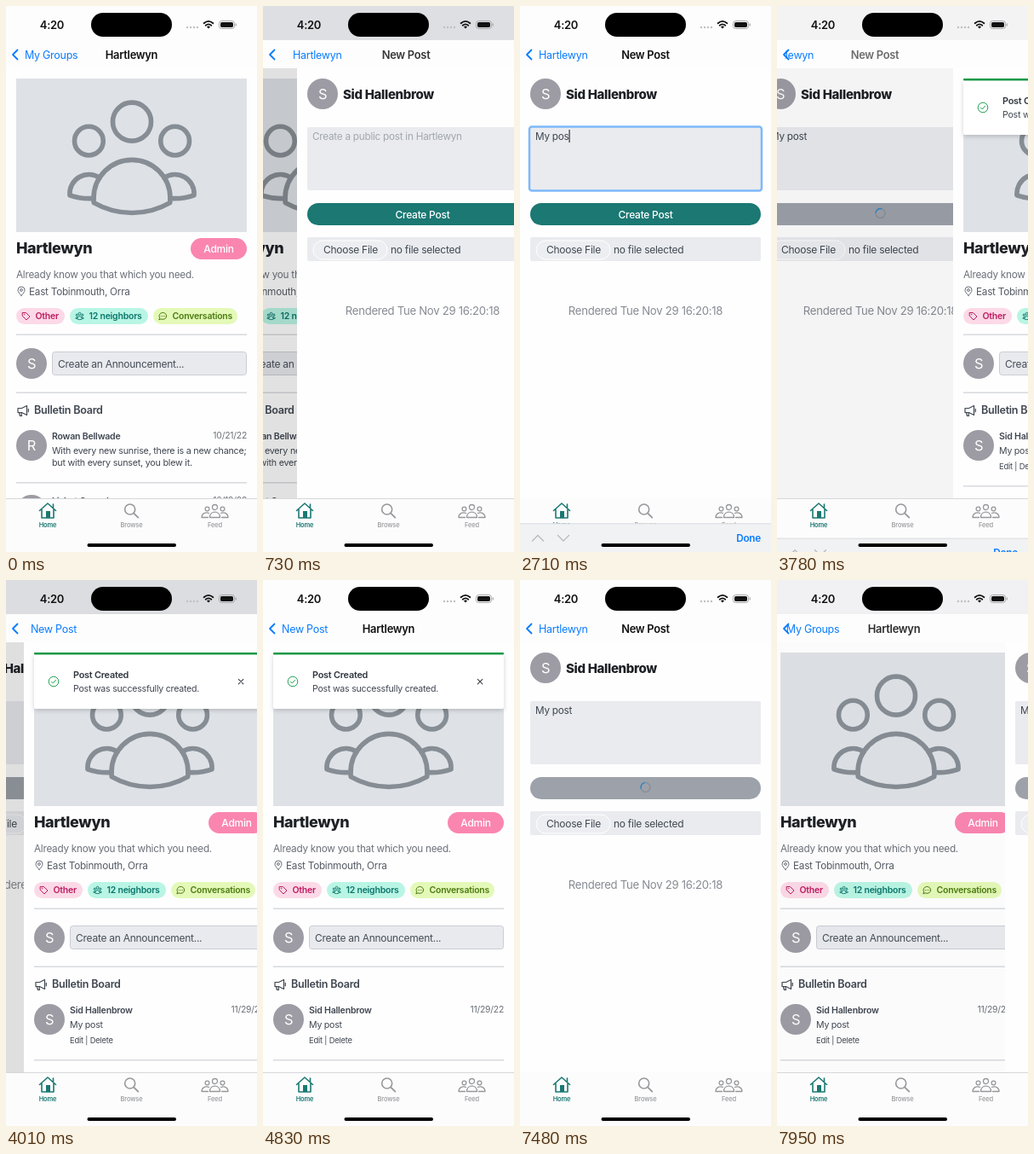
Animation of 295x640 px, one loop 8 s. Source, as an HTML page:

```html
<!DOCTYPE html>
<html lang="en">
<head>
<meta charset="utf-8">
<title>Group post demo</title>
<style>
html, body { margin: 0; width: 100%; height: 100%; overflow: hidden; background: #fff; }
svg { display: block; width: 100%; height: 100%; }
text { font-family: Inter, "Liberation Sans", sans-serif; letter-spacing: -.022em; white-space: pre; }
</style>
</head>
<body>
<svg id="stage" viewBox="0 0 295 640" xmlns="http://www.w3.org/2000/svg"></svg>
<script>
const LOOP = 8000, W = 295;
const GROUP = 'Hartlewyn', AUTHOR = 'Sid Hallenbrow';
const BLUE = '#0a7cff', TEAL = '#1b7873', INK = '#1d2025', BODY = '#3f4650', GREY = '#6b7079';

// Markup helpers
const text = (x, y, size, str, fill = BODY, more = '') =>
  `<text x="${x}" y="${y}" font-size="${size}" fill="${fill}" ${more}>${str}</text>`;
const rect = (x, y, w, h, fill, r = 0, more = '') =>
  `<rect x="${x}" y="${y}" width="${w}" height="${h}" rx="${r}" fill="${fill}" ${more}/>`;
const line = (d, color, width, more = '') =>
  `<path d="${d}" fill="none" stroke="${color}" stroke-width="${width}" stroke-linecap="round" stroke-linejoin="round" ${more}/>`;
const ring = (x, y, r, color, width) =>
  `<circle cx="${x}" cy="${y}" r="${r}" fill="none" stroke="${color}" stroke-width="${width}"/>`;
const group = (id, inner, more = '') => `<g id="${id}" ${more}>${inner}</g>`;
const rule = y => rect(12, y, 271, 1.5, '#d8dade');
const bold = w => `font-weight="${w}"`;
const MID = 'text-anchor="middle"', END = 'text-anchor="end"';

const avatar = (y, letter) =>
  `<circle cx="30" cy="${y}" r="18" fill="#9d9ca4"/>` + text(30, y + 6, 16.5, letter, '#fff', MID);

// Three people on a 24-unit grid
function crowd(x, y, s, color, width) {
  const wing = line('M18 18.72a9.1 9.1 0 0 0 3.74-.48 3 3 0 0 0-4.68-2.72', color, width) +
    ring(18.75, 9.75, 2.25, color, width);
  return `<g transform="translate(${x} ${y}) scale(${s})">` + ring(12, 6.75, 3, color, width) +
    line('M18 18.72q0 .35-.04.7A11.94 11.94 0 0 1 12 21q-3.2 0-5.96-1.58Q6 19.07 6 18.72A6 6 0 0 1 18 18.72', color, width) +
    wing + `<g transform="translate(24) scale(-1 1)">${wing}</g></g>`;
}

const feedIcon = (x, y, color, width) => `<g transform="translate(${x} ${y})">` +
  ring(0, -4, 3, color, width) + ring(-9, -2, 2.4, color, width) + ring(9, -2, 2.4, color, width) +
  line('M-6 8C-6-.5 6-.5 6 8ZM-8 8H-15.5C-15.5 3-11 1.5-7 3M8 8H15.5C15.5 3 11 1.5 7 3', color, width) + '</g>';

function chip(x, w, label, bg, fg, icon) {
  return rect(x, 354, w, 19, bg, 9.5) + icon + text(x + 22.5, 367, 10.5, label, fg, bold(600));
}

function chips() {
  const pink = '#bd1c60', green = '#0b766b', lime = '#4b7a10';
  return chip(12, 57, 'Other', '#fcd9e7', pink,
      line('M19.5 359.5H23.5L28 364L24 368L19.5 363.5Z', pink, 1) + ring(21.7, 361.6, .5, pink, .7)) +
    chip(75, 92, '12 neighbors', '#b9f5e4', green, crowd(80.8, 357.5, .48, green, 2)) +
    chip(173, 99, 'Conversations', '#e4f9b8', lime,
      line('M180 367.5L180.6 365.4A4.3 4 0 1 1 182.4 367Z', lime, 1) +
      line('M182.4 363.5h.1M184.4 363.5h.1M186.4 363.5h.1', lime, 1.1));
}

const entry = (dy, letter, name, date) => `<g transform="translate(0 ${dy})">` + avatar(515, letter) +
  text(54, 508, 10.6, name, BODY, bold(600)) + text(283, 507, 10.4, date, GREY, END) + '</g>';

const oldList = entry(0, 'R', 'Rowan Bellwade', '10/21/22') +
  text(54, 525, 10.75, 'With every new sunrise, there is a new chance;') +
  text(54, 539, 10.75, 'but with every sunset, you blew it.') +
  rule(558) + entry(76, 'L', 'Lisbet Orrenday', '10/19/22');

const newList = entry(0, 'S', AUTHOR, '11/29/22') +
  text(54, 525, 10.6, 'My post') + text(54, 543, 9.4, 'Edit | Delete') + rule(562);

const alertBox = rect(12, 86, 271, 65, '#fff', 2, 'filter="url(#shade)"') + rect(12, 85, 271, 2.5, '#199a48', 1) +
  ring(35, 119, 5.8, '#24a356', 1) + line('M32.5 119.2L34.3 121L37.6 117.2', '#24a356', 1) +
  text(58, 115, 10.9, 'Post Created', '#30363f', bold(600)) +
  text(58, 131, 10.6, 'Post was successfully created.') +
  line('M252.3 116.3l5.6 5.6m0-5.6l-5.6 5.6', '#3b414a', 1.1);

const groupPage = rect(0, 0, W, 640, '#fefefe') +
  rect(12, 85, 271, 180, '#dee2e6') + crowd(58, 85, 7.5, '#868d94', .75) +
  text(12, 290, 18, GROUP, INK, bold(800)) +
  rect(217, 272, 66, 25, '#fa86b0', 12.5) + text(250, 289, 12, 'Admin', '#fff', MID + ' ' + bold(500)) +
  text(12, 319, 11.75, 'Already know you that which you need.', GREY) +
  line('M18 339.5C15.5 336.5 14 335 14 333A4 4 0 0 1 22 333C22 335 20.5 336.5 18 339.5Z', GREY, 1) +
  ring(18, 333, 1.4, GREY, 1) + text(27, 339, 11.75, 'East Tobinmouth, Orra', '#555b64') +
  chips() + rule(384.5) + avatar(419, 'S') +
  rect(54.5, 405.5, 228, 27, '#e8eaee', 3, 'stroke="#c9cdd3"') +
  text(61, 424, 12, 'Create an Announcement...', '#464d57') + rule(452.5) +
  line('M14 471.5H18.5L24.5 468.5V479.5L18.5 476.5H14ZM15.5 477L16.5 480.5H18.5L18 477M26.3 472.3V475.7', BODY, 1.2) +
  text(33, 478, 12.6, 'Bulletin Board', BODY, bold(600)) +
  group('oldList', oldList) + group('newList', newList) + group('alert', alertBox) +
  rect(0, 0, W, 640, '#000', 0, 'id="groupDim"');

const postPage = rect(0, 0, W, 640, '#fefefe') + avatar(103, 'S') +
  text(54, 109, 15, AUTHOR, INK, bold(800)) +
  rect(12, 142, 271, 74, '#e9ebef', 2) +
  rect(11, 141.5, 273, 75, 'none', 3, 'id="focus" stroke="#7db9fa" stroke-width="2.5"') +
  text(18, 157, 11.75, '', BODY, 'id="field"') + rect(18, 145, 1.2, 15, '#333', 0, 'id="caret"') +
  rect(12, 231, 271, 26, TEAL, 13, 'id="button"') +
  text(147.5, 248.5, 12, 'Create Post', '#fff', `id="label" ${MID} ${bold(500)}`) +
  group('spinner', ring(0, 0, 5.5, '#878f97', 1.4) + line('M-5.5 0A5.5 5.5 0 0 0 0 5.5', '#2f86c9', 1.4)) +
  rect(12, 271, 271, 28, '#e9ebef', 2) +
  rect(19, 275, 87, 22, '#eceef1', 11, 'stroke="#fff"') +
  text(31, 290, 12, 'Choose File', '#414851') + text(110, 290, 12, 'no file selected', '#414851') +
  text(147.5, 362, 13.15, 'Rendered Tue Nov 29 16:20:18', '#868b93', MID) +
  rect(0, 0, W, 640, '#000', 0, 'id="postDim"');

const navBar = rect(0, 0, W, 73, '#fdfdfd') + rect(0, 0, W, 40, '#d9dbde', 0, 'id="status"') +
  line('M13.5 51.5L8 57L13.5 62.5', BLUE, 1.8) +
  '<g clip-path="url(#backClip)">' + text(22, 61.5, 12.5, '', BLUE, 'id="backLow"') +
  text(22, 61.5, 12.5, '', BLUE, 'id="backHigh"') + '</g>' +
  text(147.5, 61.5, 12.9, '', '#111', `id="titleLow" ${MID} ${bold(600)}`) +
  text(147.5, 61.5, 12.9, '', '#111', `id="titleHigh" ${MID} ${bold(600)}`) +
  text(54, 26.5, 13, '4:20', '#111', MID + ' ' + bold(600)) + rect(100, 8, 95, 28, '#000', 14) +
  [213, 217, 221, 225].map(x => `<circle cx="${x}" cy="25" r="1.2" fill="#bfc0c4"/>`).join('') +
  line('M232.6 20.2Q238 15.5 243.4 20.2M234.7 22.7Q238 20 241.3 22.7', '#111', 1.8) +
  '<path d="M236 24.4Q238 22.8 240 24.4L238 26.6Z" fill="#111"/>' +
  rect(250.5, 17.5, 18, 9, 'none', 3, 'stroke="#a5a6aa"') + rect(252, 19, 15, 6, '#111', 1.7) +
  rect(269.6, 20.3, 1.2, 3.4, '#a5a6aa', .6);

const tabBar = rect(0, 577, W, 63, '#fcfcfc') + rect(0, 577, W, 1, '#d6d7da', 0, 'id="tabLine"') +
  line('M39.5 591.5L49 583L58.5 591.5M42 590V600H56V590M55.5 588.5V584', TEAL, 1.6) +
  rect(47, 592, 5, 8, TEAL) + text(49, 611, 7.5, 'Home', TEAL, MID + ' ' + bold(600)) +
  ring(145.7, 590, 6, '#97989c', 1.6) + line('M150.2 594.6L155.3 599.6', '#97989c', 1.9) +
  text(147.5, 611, 7.5, 'Browse', '#97989c', MID + ' ' + bold(500)) +
  feedIcon(245.5, 591.5, '#97989c', 1.3) +
  text(245.5, 611, 7.5, 'Feed', '#97989c', MID + ' ' + bold(500));

const toolbar = rect(0, 606.5, W, 40, '#f1f2f4') + rect(0, 606.5, W, .8, '#d5d6d9') +
  line('M14.5 627L21 620.5L27.5 627M44.5 620.5L51 627L57.5 620.5', '#b9bbbf', 1.4) +
  text(283, 628, 11.8, 'Done', BLUE, END + ' ' + bold(600));

document.getElementById('stage').innerHTML = `<defs>
  <clipPath id="pageClip"><rect y="73" width="${W}" height="504"/></clipPath>
  <clipPath id="backClip"><rect x="9.5" y="40" width="200" height="33"/></clipPath>
  <filter id="shade" x="-10%" y="-20%" width="120%" height="150%">
    <feDropShadow dx="0" dy="2" stdDeviation="2.5" flood-color="#000" flood-opacity=".18"/></filter></defs>` +
  rect(0, 0, W, 640, '#fefefe') +
  group('pages', group('groupPage', groupPage) + group('postPage', postPage), 'clip-path="url(#pageClip)"') +
  navBar + tabBar + group('toolbar', toolbar) + rect(95.5, 630, 104.5, 4, '#000', 2);

const el = {};
document.querySelectorAll('svg [id]').forEach(n => el[n.id] = n);
const set = (id, name, value) => el[id].setAttribute(name, value);
const show = (id, on) => set(id, 'visibility', on ? 'visible' : 'hidden');
const clamp = v => Math.min(1, Math.max(0, v));
const spring = (t, start, speed) => {
  const s = Math.max(0, t - start) / 1000 * speed;
  return 1 - (1 + s) * Math.exp(-s);
};
const ease = (t, a, b) => { const k = clamp((t - a) / (b - a)); return k * k * (3 - 2 * k); };

// Navigation stack: [back label, title, page]
const SCREENS = [
  ['My Groups', GROUP, 'groupPage'],
  [GROUP, 'New Post', 'postPage'],
  ['New Post', GROUP, 'groupPage']
];

// Lower screen of the visible pair, and how far the upper one covers it
function stackAt(t) {
  if (t < 1410) return [0, spring(t, 480, 14)];
  if (t < 3690) return [0, 1];
  if (t < 4830) return [1, spring(t, 3703, 14)];
  if (t < 6336) return [1, 1];
  if (t < 7230) return [1, 1 - spring(t, 6336, 10.2)];
  return [0, 1 - spring(t, 7480, 8.5)];
}

// The status bar tints while a page moves
function tintAt(t, q) {
  if (t < 1410 || t >= 3690 && t < 4830) return q;
  return t > 6336 && q > .005 && q < .995 ? .35 : 0;
}

function navText(id, str, x, opacity) {
  if (el[id].textContent !== str) el[id].textContent = str;
  set(id, 'x', x);
  set(id, 'opacity', clamp(opacity));
}

function drawStack(t) {
  const [i, q] = stackAt(t), low = SCREENS[i], high = SCREENS[i + 1];
  if (el.pages.lastElementChild !== el[high[2]]) el.pages.append(el[high[2]]);
  set(high[2], 'transform', `translate(${Math.round(W * (1 - q))})`);
  set(low[2], 'transform', `translate(${Math.round(-.3 * W * q)})`);
  set(high[2].replace('Page', 'Dim'), 'opacity', 0);
  set(low[2].replace('Page', 'Dim'), 'opacity', .13 * q);

  const late = i === 1 && t < 4130;
  navText('backLow', low[0], 22 - 122 * q, 1 - (q - .4) * 2.5);
  navText('backHigh', high[0], 22 + 97 * (1 - q), (q - .4) * 2.5);
  navText('titleLow', low[1], 147.5 - 109 * q, 1 - 1.3 * q);
  navText('titleHigh', high[1], 147.5 + 153 * (1 - q), late ? 0 : 1 - 1.2 * (1 - q));

  set('status', 'opacity', tintAt(t, q));
  show('tabLine', i === 1 ? q > .005 : q < .99);
}

const TYPED = [[2000, 'M'], [2220, 'My '], [2380, 'My po'], [2710, 'My pos'], [3300, 'My post']];

function drawForm(t) {
  const last = TYPED.filter(k => t >= k[0]).pop();
  const str = last ? last[1] : 'Create a public post in ' + GROUP;
  if (el.field.textContent !== str) el.field.textContent = str;
  set('field', 'fill', last ? BODY : '#a2a6ae');

  const focused = t >= 1630 && t < 3670, busy = t >= 3670;
  show('focus', focused);
  show('caret', focused);
  set('caret', 'x', 18 + (last ? el.field.getComputedTextLength() : 0));
  set('button', 'fill', busy ? '#9ca1aa' : TEAL);
  set('button', 'rx', busy && t < 7230 ? 2 : 13);
  set('label', 'opacity', busy ? 0 : t >= 3440 ? .65 : 1);
  show('spinner', busy);
  set('spinner', 'transform', `translate(147.5 243) rotate(${(t - 6570) * .48})`);

  const up = ease(t, 1640, 1960) - ease(t, 3670, 3890);
  set('toolbar', 'transform', `translate(0 ${(1 - up) * 34})`);
}

function draw(t) {
  drawStack(t);
  drawForm(t);
  const posted = t >= 3690;
  show('oldList', !posted);
  show('newList', posted);
  show('alert', posted && t < 7230);
}

const began = performance.now();
function tick() {
  draw((performance.now() - began) % LOOP);
  requestAnimationFrame(tick);
}
draw(0);
requestAnimationFrame(tick);
</script>
</body>
</html>
```
